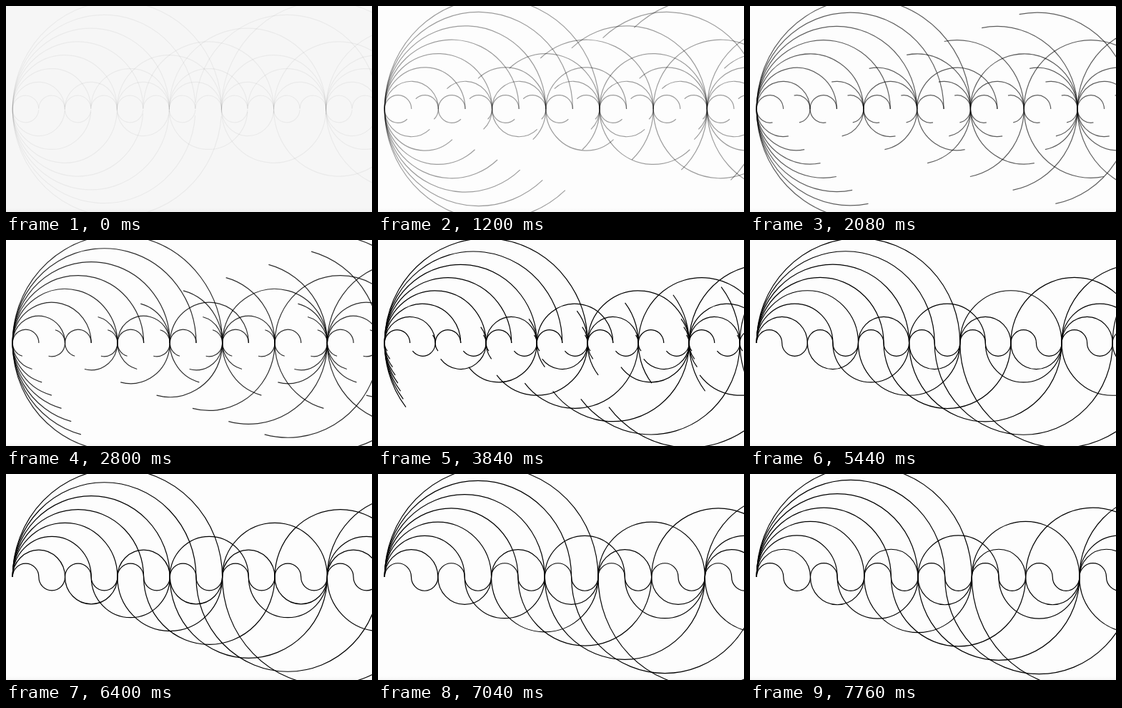
An HTML page with a canvas for the animation above (7840 ms loop, 512 by 288 pixels).

```html
<!DOCTYPE html>
<html lang="en">
<head>
<meta charset="utf-8">
<title>Semicircle waves</title>
<style>
html, body { margin: 0; width: 100%; height: 100%; overflow: hidden; background: #fdfdfd; }
canvas { display: block; width: 100vw; height: 100vh; }
</style>
</head>
<body>
<canvas id="stage" width="512" height="288"></canvas>
<script>
const W = 512, H = 288, LOOP = 7840, STEP = 80;
const LEFT = 9.2, MID = 144, WAVES = 8, STRETCH = 1.03;
const ctx = document.getElementById('stage').getContext('2d');

const shade = ctx.createLinearGradient(0, H - 5, 0, H);
shade.addColorStop(0, 'rgba(0,0,0,0)');
shade.addColorStop(1, 'rgba(0,0,0,.035)');

function drawWave(n, unit, turn) {
  const r = n * unit / 2;
  for (let k = 0, x = LEFT + r; x - r < W; k++, x += 2 * r) {
    // Even links lose their lower half; odd links roll from top to bottom.
    const from = k % 2 ? Math.PI + turn : turn;
    const to = k % 2 ? 2 * Math.PI + turn : 2 * Math.PI;
    ctx.beginPath();
    ctx.ellipse(x, MID, r, r * STRETCH, 0, from, to);
    ctx.stroke();
  }
}

function draw(ms) {
  const t = ms / 1000 + 0.11;
  const unit = 36.4 + 1.24 * Math.sin(t);
  const turn = Math.PI * Math.min(1, t / 5);
  const paper = Math.round(246 + 7 * Math.min(1, ms / 400));

  ctx.globalAlpha = 1;
  ctx.fillStyle = `rgb(${paper},${paper},${paper})`;
  ctx.fillRect(0, 0, W, H);
  ctx.fillStyle = shade;
  ctx.fillRect(0, H - 5, W, 5);

  ctx.globalAlpha = Math.min(1, 0.02 + t / 3.6);
  ctx.strokeStyle = '#000';
  ctx.lineWidth = 1.2;
  for (let n = 1; n <= WAVES; n++) drawWave(n, unit, turn);
}

function tick() {
  const ms = performance.now() % LOOP;
  draw(Math.floor(ms / STEP) * STEP);
  requestAnimationFrame(tick);
}
tick();
</script>
</body>
</html>
```
